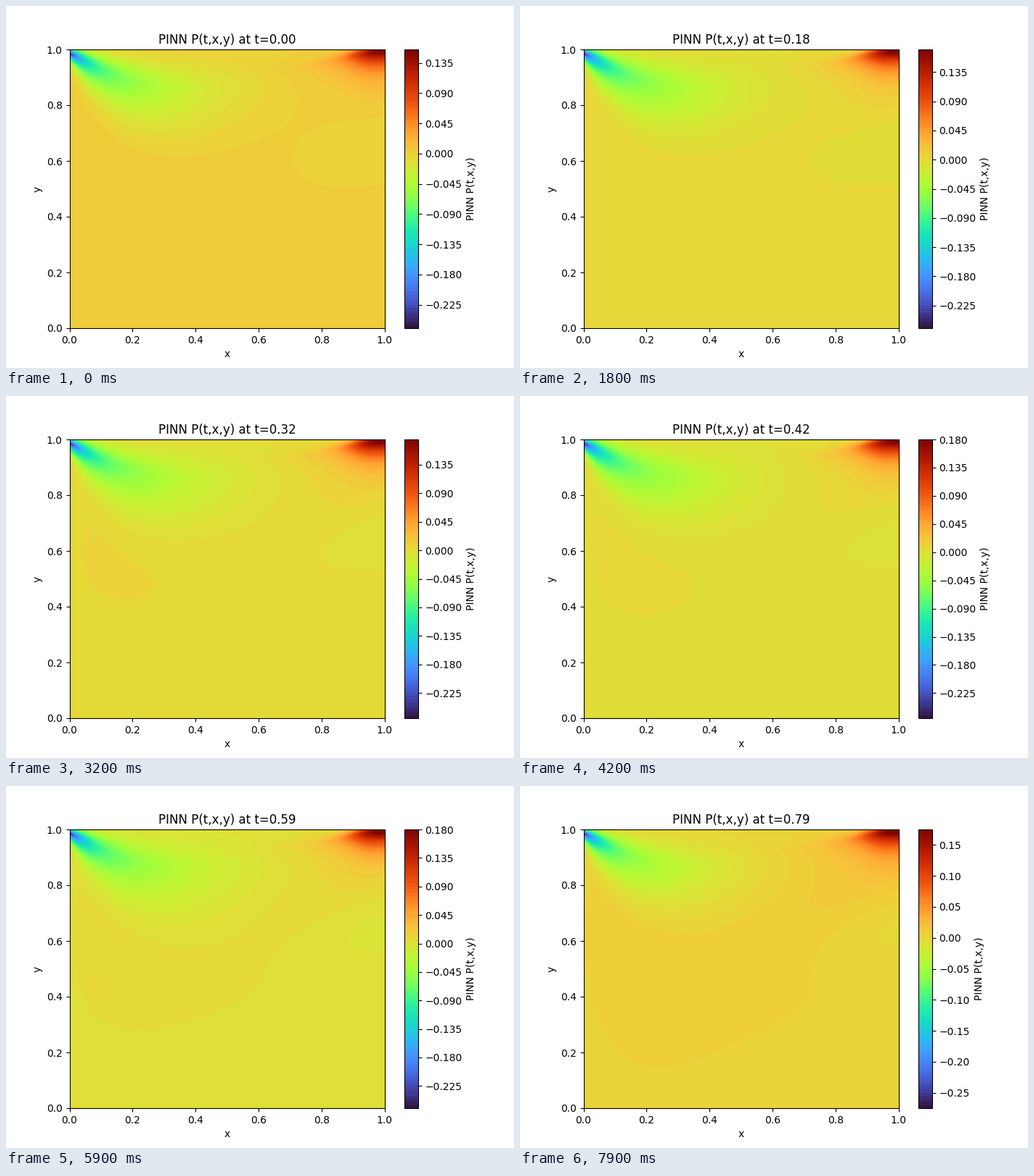
Recreate the animation shown at these times as a matplotlib script. Size 700 by 500 pixels, loop 8000 ms.

```python
import numpy as np
import matplotlib.pyplot as plt
from matplotlib.animation import FuncAnimation

FRAMES, INTERVAL, STEP = 80, 100, 0.005

# grid refined towards the two upper corners
s = np.linspace(0, 1, 150)
x = s**1.5 * (1 - s) + s * (1 - (1 - s)**1.3)
y = 1 - s[::-1]**1.6
X, Y = np.meshgrid(x, y)
U = 1 - X


def peak(t):
    return .1525 + .129 * t * np.exp(-2 * t)


def trough(t):
    return -.2555 - .0142 * t + .0045 * np.cos(2 * np.pi * (t - .11) / .45)


def bell(d, low, high):
    """Lorentz bump with separate widths below and above its centre."""
    return 1 / (1 + (d / np.where(d < 0, low, high))**2)


def plume(t):
    """Suction plume leaving the upper left corner."""
    amp = ((-trough(t) - .088) * np.exp(-X / .045)
           + .092 * np.exp(-(X / .36)**1.6) * (1 - .2 * t * np.tanh(X / .15)))
    d = Y - (.82 + .165 * np.exp(-(X / .2)**1.2) + .14 * X**2)
    below = .155 * (1 - np.exp(-X / .16)) + .02
    above = .1 * X / (X + .25) + .01
    power = 1.75 - .45 * np.exp(-X / .15)
    return -amp * np.where(d < 0, np.exp(-(np.abs(d) / below)**power),
                           np.exp(-(d / above)**2 / 2))


def hot_corner(t):
    """Pressure peak at the upper right corner."""
    bend = (U / .15)**2
    d = Y - (.992 - .045 * bend / (1 + .55 * bend))
    shape = np.where(d < 0, np.exp((.006 - np.hypot(d, .006)) / .05),
                     np.exp(-(d / .016)**2 / 2))
    return (peak(t) - .004) / (1 + (U / .1)**3) * shape


def swell(t):
    """Slow rise in the middle: a left lobe and a ridge from the right."""
    wall = 1 - np.exp(-X / (.022 + .1 * np.clip(.6 - Y, 0, 1)))
    side = bell(X - .2, 10, .36)
    left = (.002 + .002 * t + .0055 * t**2) * wall * side * bell(Y - .575, .29, .29)
    grow = np.maximum(t - .235 + .9 * (np.minimum(X, .85) - .635), 0)
    ridge = .0155 * grow * bell(Y - (.66 + .72 * (X - .635)), .19, .35)
    return np.hypot(left, ridge)


def dip():
    """Weak negative pocket on the right wall."""
    d = Y - (.655 - .24 * U)
    return -.007 * np.exp(-(U / .305)**2 - (d / .143)**2)


def pressure(t):
    return .0025 + plume(t) + hot_corner(t) + swell(t) + dip()


fig = plt.figure(figsize=(7, 5), dpi=100)


def draw(i):
    t = i / 100
    lo, hi = np.floor(trough(t) / STEP), np.ceil(peak(t) / STEP)
    levels = np.arange(lo, hi + 1) * STEP
    P = np.clip(pressure(t), levels[0] + 1e-4, levels[-1] - 1e-4)
    fig.clear()
    ax = fig.add_subplot()
    filled = ax.contourf(X, Y, P, levels=levels, cmap="turbo")
    fig.colorbar(filled, ax=ax, label="PINN P(t,x,y)")
    ax.set(title=f"PINN P(t,x,y) at t={t:.2f}", xlabel="x", ylabel="y")
    return []


anim = FuncAnimation(fig, draw, frames=FRAMES, interval=INTERVAL,
                     init_func=lambda: [], repeat=True, repeat_delay=0)
plt.show()
```
